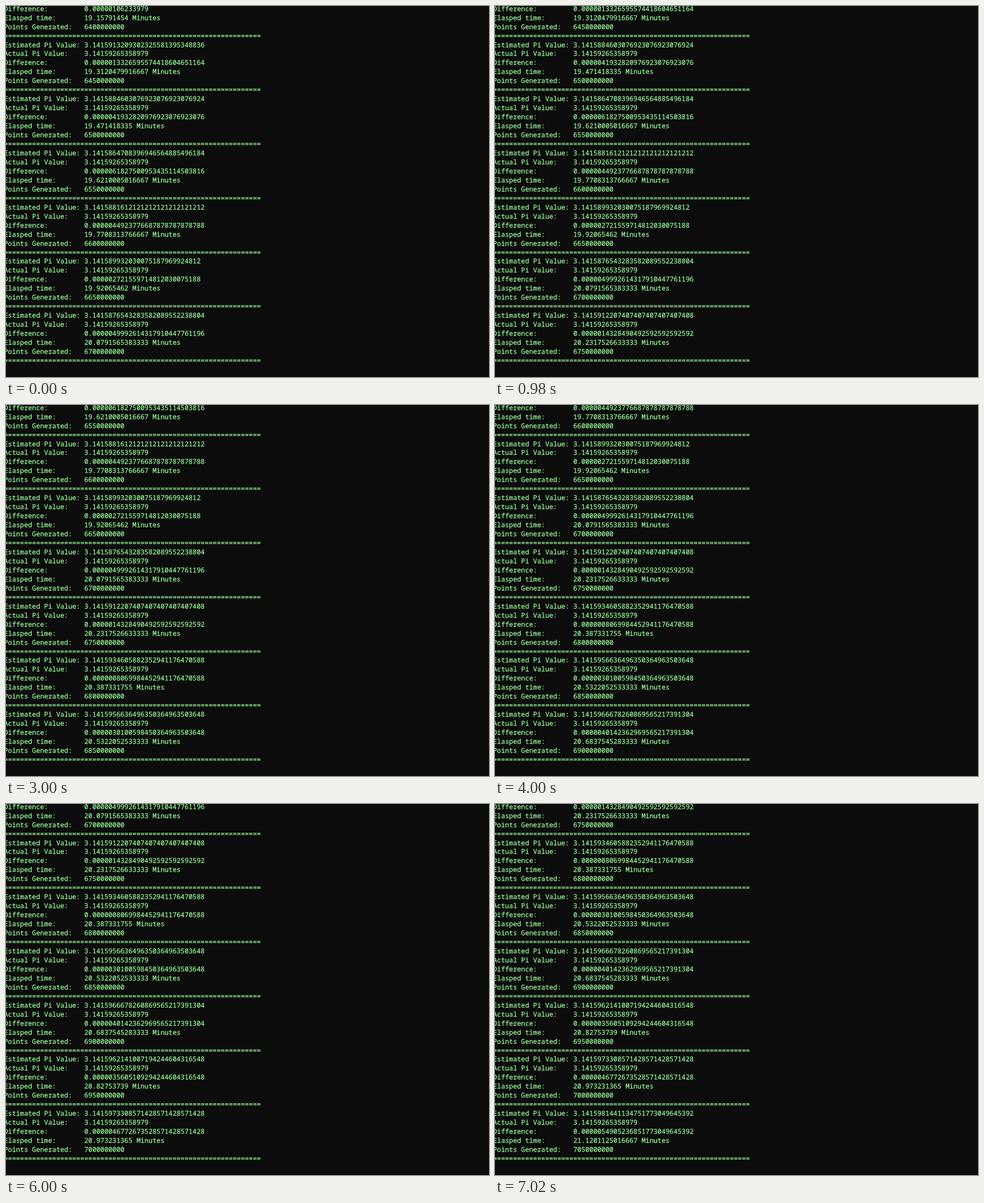
An HTML page that plays this animation: 853 px wide and 656 px high, repeating every 8 s.

```html
<!DOCTYPE html>
<html lang="en">
<head>
<meta charset="utf-8">
<title>Pi estimation</title>
<style>
  html, body { margin: 0; width: 100%; height: 100%; overflow: hidden; background: #0c0c0c; }
  svg { display: block; }
  text {
    font: 11.82px "Noto Sans Mono", "DejaVu Sans Mono", monospace;
    font-variant-ligatures: none;
    fill: #98fb98;
    stroke: #98fb98;
    stroke-width: 0.25px;
    white-space: pre;
    text-rendering: geometricPrecision;
  }
</style>
</head>
<body>
<svg id="screen" width="853" height="656" viewBox="0 0 853 656"></svg>
<script>
const LOOP = 8000;
const SCROLLS = [980, 2000, 3000, 4000, 5000, 6000, 7020];
const ROWS = 40, LEFT = -3.5, BASE = 8.7, PITCH = 15.957;

// Monte Carlo reports: points inside the circle beyond the expected count, and seconds run
const SURPLUS = [-1700, -2149, -6814, -10124, -7412, -4525, -8374,
  -2418, 1372, 5155, 6925, 6186, 8185, 9677];
const SECONDS = [1149.4748724, 1158.7228795, 1168.2851001, 1177.2600301, 1186.2498826,
  1195.2392772, 1204.7493923, 1213.9051598, 1223.2399053, 1231.9323152,
  1241.0252717, 1249.6522434, 1258.3938819, 1267.2067501];

// decimals are BigInts with 28 places
const ONE = 10n ** 28n;
const PI = 314159265358979n * 10n ** 14n;

function decimal(v) {
  const places = String(v % ONE).padStart(28, "0").replace(/0+$/, "");
  return `${v / ONE}.${places}`;
}

function ratio(a, b) {
  const divisor = BigInt(b);
  return (2n * BigInt(a) * ONE + divisor) / (2n * divisor);
}

const field = (label, value) => (label + ":").padEnd(20) + value;

const log = SURPLUS.flatMap((surplus, i) => {
  const points = 6.4e9 + 5e7 * i;
  const hits = Math.round(points * Math.PI / 4) + surplus;
  const estimate = 4n * ratio(hits, points);
  const error = estimate > PI ? estimate - PI : PI - estimate;
  const minutes = Number((SECONDS[i] / 60).toPrecision(15));
  return [
    field("Estimated Pi Value", decimal(estimate)),
    field("Actual Pi Value", decimal(PI)),
    field("Difference", decimal(error)),
    field("Elasped time", minutes + " Minutes"),
    field("Points Generated", points),
    "=".repeat(64)
  ];
});

const screen = document.getElementById("screen");
const rows = Array.from({ length: ROWS }, (_, i) => {
  const row = document.createElementNS("http://www.w3.org/2000/svg", "text");
  row.setAttribute("x", LEFT);
  row.setAttribute("y", Math.round(BASE + i * PITCH));
  return screen.appendChild(row);
});

let shown = -1;
function draw(time) {
  const step = SCROLLS.filter(t => t <= time).length;
  if (step === shown) return;
  shown = step;
  rows.forEach((row, i) => { row.textContent = log[step * 6 + 2 + i]; });
}

const start = performance.now();
function tick() {
  draw((performance.now() - start) % LOOP);
  requestAnimationFrame(tick);
}
tick();
</script>
</body>
</html>
```
